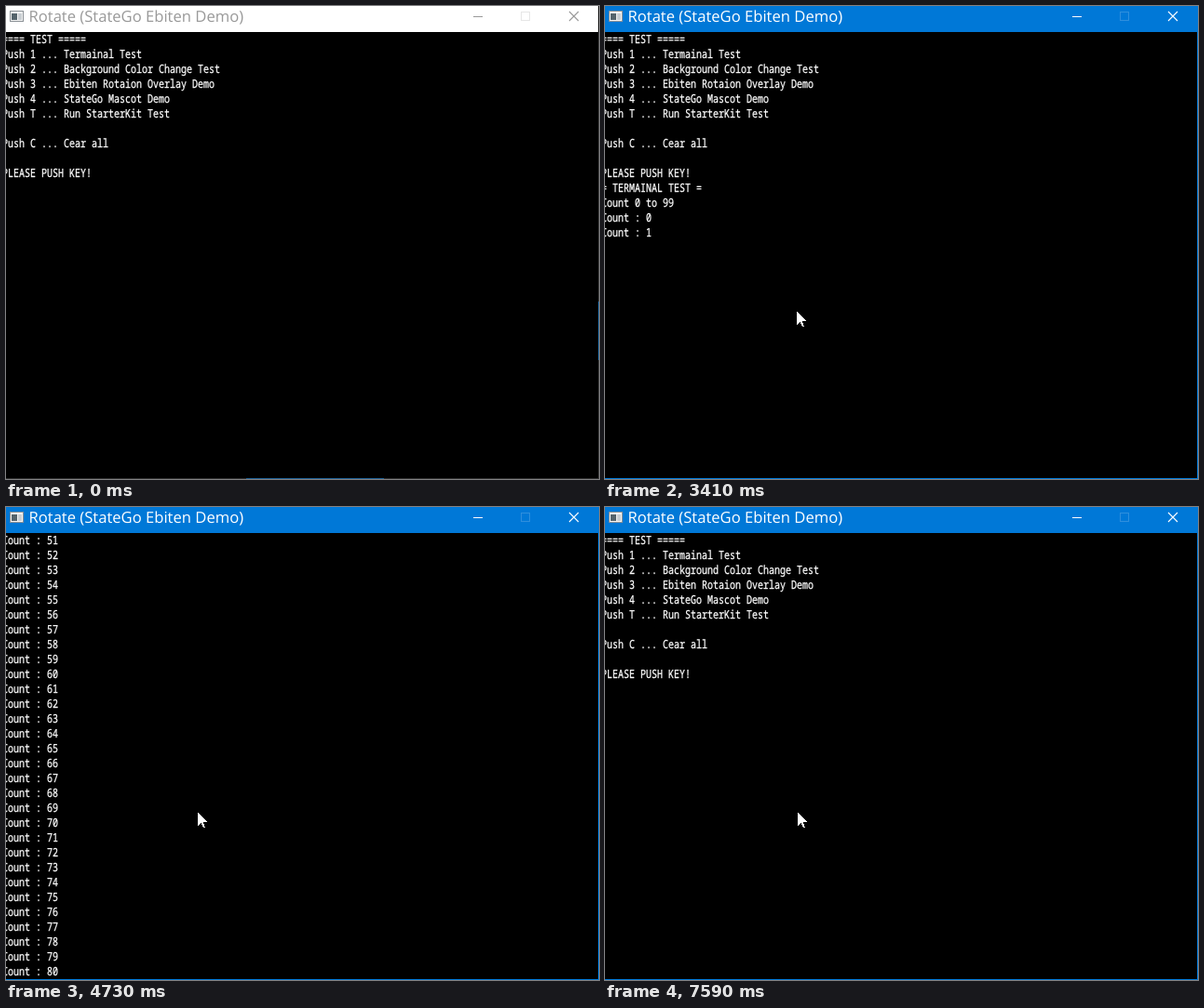
Recreate the animation shown at these times as an HTML page. Size 637x509 px, loop 8 s.

```html
<!DOCTYPE html>
<html lang="en">
<head>
<meta charset="utf-8">
<title>Terminal demo</title>
<style>
html, body { margin: 0; width: 100%; height: 100%; overflow: hidden; background: #000; }
#win {
  --bar: #0078d7; --ink: #fff; --dim: #2f8fdd; --edge: #0078d7;
  position: absolute; left: 0; top: 0; width: 637px; height: 509px;
  overflow: hidden; background: #000;
}
#win.idle { --bar: #fff; --ink: #999; --dim: #e6e6e6; --edge: #2b2b2b; }
#bar { position: absolute; left: 0; top: 0; width: 637px; height: 28px; background: var(--bar); }
#title {
  position: absolute; left: 24.5px; top: -1px; white-space: pre;
  font: 16.6px/23px "Open Sans", "Noto Sans", sans-serif;
  text-rendering: geometricPrecision; color: var(--ink);
}
svg { position: absolute; left: 0; top: 0; }
/* 7.5px advance narrowed to a 6px terminal cell */
#term {
  position: absolute; left: -4.4px; top: 28px; margin: 0; color: #fff;
  font: 12.5px/16px "Noto Sans Mono", "DejaVu Sans Mono", monospace;
  text-rendering: geometricPrecision; font-variant-ligatures: none;
  -webkit-text-stroke: .3px #fff;
  transform: scaleX(.8); transform-origin: 0 0;
}
#edge {
  position: absolute; left: 0; top: 28px; width: 636px; height: 480px;
  border: solid var(--edge); border-width: 0 1px 1px 0;
}
#behind { display: none; }
.idle #behind { display: inline; }
</style>
</head>
<body>
<div id="win" class="idle">
  <div id="bar"></div>
  <div id="title">Rotate (StateGo Ebiten Demo)</div>
  <pre id="term"></pre>
  <div id="edge"></div>
  <svg width="637" height="509" fill="none">
    <g shape-rendering="crispEdges">
      <g id="behind">
        <path d="M636.5 0V28" stroke="#2b2b2b"/>
        <path d="M636.5 318V381M258 508.5H406" stroke="#1d5f94"/>
      </g>
      <path d="M4 5h15v12H4z" fill="#8b9196"/>
      <path d="M5 6h13v10H5z" fill="#f4f4f4"/>
      <path d="M6 8h6v7H6z" fill="#56646c"/>
      <path d="M13 8h4v7h-4z" fill="#c9ced2"/>
      <path d="M502 11.5h10" stroke="var(--ink)"/>
      <path d="M553.5 6.5h9v9h-9z" stroke="var(--dim)"/>
      <path id="cursor" d="M0-.5V14L3.5 10.5L6 16H8L6 10H10.5Z" fill="#fff"/>
    </g>
    <path d="M605 6l10 10M615 6l-10 10" stroke="var(--ink)" stroke-width="1.1"/>
  </svg>
</div>
<script>
const LOOP = 8000, ROWS = 30;
const MENU = [
  "==== TEST =====",
  "Push 1 ... Termainal Test",
  "Push 2 ... Background Color Change Test",
  "Push 3 ... Ebiten Rotaion Overlay Demo",
  "Push 4 ... StateGo Mascot Demo",
  "Push T ... Run StarterKit Test",
  "",
  "Push C ... Cear all",
  "",
  "PLEASE PUSH KEY!"
];

// start, end, first count, last count, refreshes
const RUNS = [
  [3410, 4180, 1, 46, 12],
  [4180, 4240, 46, 50, 1],
  [4240, 4730, 50, 80, 8],
  [4730, 5040, 80, 99, 5]
];

const $ = id => document.getElementById(id);
const win = $("win"), term = $("term"), cursor = $("cursor");

function countAt(t) {
  if (t < RUNS[0][0]) return -1;
  const run = RUNS.find(r => t < r[1]);
  if (!run) return 99;
  const [start, end, from, to, steps] = run;
  let k = 0;
  while (start + Math.ceil((k + 1) * (end - start) / steps / 10) * 10 <= t) k++;
  return Math.round(from + (to - from) * k / steps);
}

function linesAt(t) {
  if (t >= 6100 && t < 7590) return [];
  const lines = [...MENU];
  if (t >= 7590) return lines;
  if (t >= 1350) lines.push("= TERMAINAL TEST =");
  if (t >= 1850) lines.push("Count 0 to 99");
  for (let n = 0, last = countAt(t); n <= last; n++) lines.push("Count : " + n);
  return lines.slice(-ROWS);
}

function cursorAt(t) {
  if (t < 50) return [-50, -50];
  if (t >= 5720) return [207, 329];
  const k = Math.min(6, Math.floor((t - 50) / 60));
  const left = (1 - k / 6) ** 2;
  return [Math.round(206 + 250 * left), Math.round(329 + 165 * left)];
}

let shown = null;
function draw(now) {
  const t = now % LOOP;
  win.classList.toggle("idle", t < 600);
  const text = linesAt(t).join("\n");
  if (text !== shown) term.textContent = shown = text;
  cursor.setAttribute("transform", `translate(${cursorAt(t)})`);
}

const begin = performance.now();
function tick() {
  draw(performance.now() - begin);
  requestAnimationFrame(tick);
}
tick();
</script>
</body>
</html>
```
